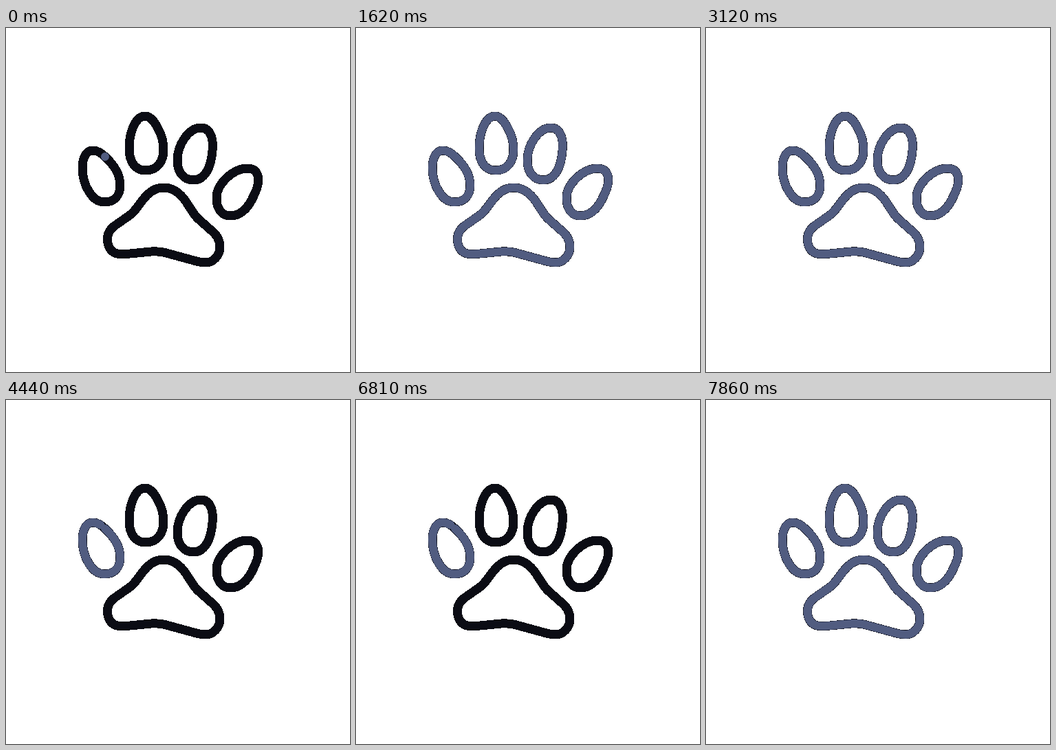
An HTML page for the animation above (8 s loop, 500 by 500 pixels).

```html
<!DOCTYPE html>
<html lang="en">
<head>
<meta charset="utf-8">
<title>Paw outline</title>
<style>
  html, body { margin: 0; width: 100%; height: 100%; overflow: hidden; background: #fff; }
  svg { display: block; width: 100vw; height: 100vh; }
  path { fill: none; stroke-linecap: round; stroke-linejoin: round; }
  #base { stroke: #0b0c14; stroke-width: 13; shape-rendering: crispEdges; }
  #ink { stroke: #515c80; stroke-width: 12; }
</style>
</head>
<body>
<svg viewBox="0 0 500 500"><g id="base"></g><g id="ink"></g></svg>
<script>
const LOOP = 8000, CYCLE = 2370, SWEEP = 753, ERASE_AT = 1584;

// Four toes from left to right, then the pad
const shapes = [
  'M144 187C155 197 166 212 166 229C166 244 157 253 143 253C125 253 111 228 111 203C111 188 117 178 126 178C132 178 138 181 144 187Z',
  'M221 146C226 155 229 166 229 177C229 196 218 207 203 207C188 207 179 195 179 175C179 148 190 128 202 128C209 128 216 136 221 146Z',
  'M297 154C300 160 301 168 300 178C298 205 288 221 272 221C258 221 249 209 249 193C249 169 266 145 283 145C289 145 294 148 297 154Z',
  'M364.5 211C369 219 366 232 360 244C352 262 341 273 326 273C313 273 306 262 306 247C306 226 331 204 351 204C357 204 362 206 364.5 211Z',
  'M229 232C243 232 254 241 262 253C268 262 272 270 279 277L297 293C306 300 311 308 311 318C311 331 301 341 290 341C284 341 280 340 275 338.5L231 326.5C223 324.5 214 324.5 206 325.5L180 328C175 328.5 170 328.5 166 328.5C155 328.5 147.5 320 147.5 307C147.5 298 152 291 160 286L180 272C187 267 191 260 198 251C206 240 216 232 229 232Z'
];

function addPath(groupId, d) {
  const path = document.createElementNS('http://www.w3.org/2000/svg', 'path');
  path.setAttribute('d', d);
  document.getElementById(groupId).append(path);
  return path;
}

shapes.forEach(d => addPath('base', d));
const strokes = shapes.map(d => {
  const path = addPath('ink', d);
  return { path, length: path.getTotalLength() };
});
const total = strokes.reduce((sum, s) => sum + s.length, 0);

// cubic-bezier(.7, 0, .3, 1), solved by bisection
function ease(x) {
  if (x <= 0) return 0;
  if (x >= 1) return 1;
  let lo = 0, hi = 1, s;
  for (let i = 0; i < 24; i++) {
    s = (lo + hi) / 2;
    const bx = 2.1 * s * (1 - s) ** 2 + 0.9 * s * s * (1 - s) + s ** 3;
    if (bx < x) lo = s; else hi = s;
  }
  return s * s * (3 - 2 * s);
}

function render(time) {
  const phase = time % LOOP % CYCLE;
  const shown = ease(phase / SWEEP) - ease((phase - ERASE_AT) / SWEEP);
  let left = shown * total;
  for (const { path, length } of strokes) {
    path.style.visibility = left > 0.001 ? 'visible' : 'hidden';
    path.style.strokeDasharray = left < length - 0.01 ? `${Math.max(left, 0)} ${length * 2}` : 'none';
    left -= length;
  }
}

const start = performance.now();
function tick() {
  render(performance.now() - start);
  requestAnimationFrame(tick);
}
render(0);
requestAnimationFrame(tick);
</script>
</body>
</html>
```
